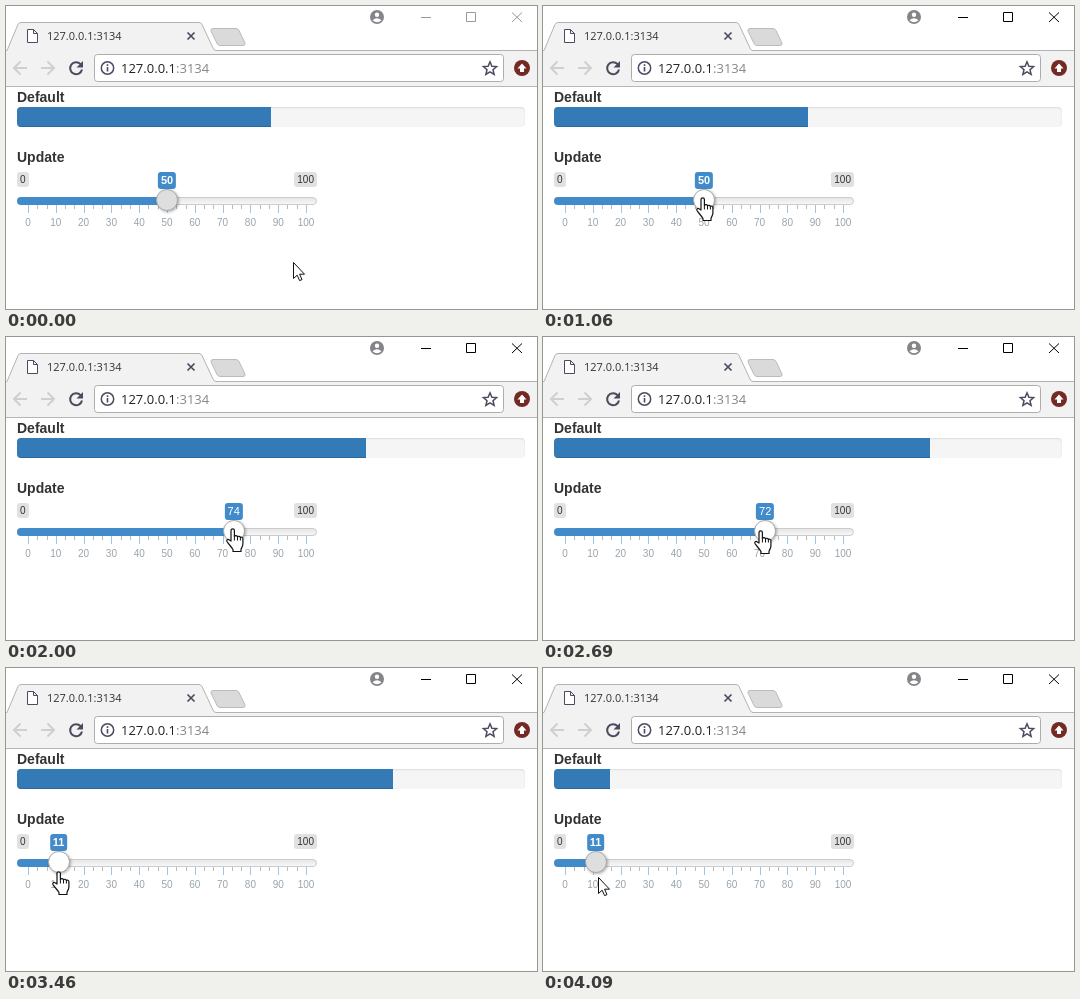
Recreate the animation shown at these times as an HTML page. Size 531 px wide and 303 px high, loop 4620 ms.

```html
<!DOCTYPE html>
<html lang="en">
<head>
<meta charset="utf-8">
<title>Progress bar update</title>
<style>
  html, body { margin: 0; width: 100%; height: 100%; overflow: hidden; background: #fff; }
  body { position: relative; font: 10px/1.333 "Liberation Sans", Arial, sans-serif; color: #333; }
  body > *, #slider * { position: absolute; box-sizing: border-box; }
  svg { left: 0; top: 0; }
  .ui { font-family: "Open Sans", "Noto Sans", sans-serif; }
  h4 { margin: 0; left: 11px; font-size: 14px; line-height: 20px; }
  #progress { left: 11px; top: 101px; width: 508px; height: 20px; border-radius: 4px; overflow: hidden;
    background: #f5f5f5; box-shadow: inset 0 1px 2px rgba(0,0,0,.1); }
  #bar { height: 100%; background: #337ab7; box-shadow: inset 0 -1px 0 rgba(0,0,0,.15); }
  #slider { left: 11px; top: 166px; width: 300px; height: 60px; }
  .tag { top: 0; padding: 1px 3px; border-radius: 3px; background: #e1e1e1; }
  #slider #value { background: #428bca; color: #fff; font-size: 11px; transform: translateX(-50%); }
  #line { top: 25px; width: 300px; height: 8px; border: 1px solid #ccc; border-radius: 8px;
    background: linear-gradient(#dedede -50%, #fff 150%); }
  #fill { top: 25px; height: 8px; border-radius: 8px 0 0 8px; background: #428bca; }
  #handle { top: 17px; width: 22px; height: 22px; border: 1px solid #aaa; border-radius: 50%;
    box-shadow: 1px 1px 3px rgba(0,0,0,.3); }
  .tick { top: 33px; width: 1px; height: 4px; background: #bbb; }
  .tick.big { height: 8px; background: #a0c5e4; }
  .num { top: 44px; color: #99a4ac; transform: translateX(-50%); }
</style>
</head>
<body>
<svg width="531" height="82" fill="none">
  <path d="M0 44h531v36H0z" fill="#f2f2f2"/>
  <path d="M0 44.5H1L12 18.500Q13 16.500 15 16.500H193Q195 16.500 196 18.500L207 42Q208 44.500 210 44.500H531" fill="#f2f2f2" stroke="#b3b3b3"/>
  <path d="M2 45H208" stroke="#f2f2f2" stroke-width="2"/>
  <path d="M207 22.500H230Q232 22.500 233 24.500L239 37Q239.500 39.500 237 39.500H214Q212 39.500 211 37.500L205 25Q204.500 22.500 207 22.500Z" fill="#dadada" stroke="#bcbcbc"/>
  <path d="M0 80.500H531" stroke="#b6b6b6"/>
  <path d="M21.500 23.500H27.500L31.500 27.500V36.500H21.500ZM27.500 23.500V27.500H31.500" fill="#fff" stroke="#4b4a60"/>
  <path d="M181.500 26.500l7 7m0-7l-7 7" stroke="#4b4a60" stroke-width="1.700"/>
  <g stroke="#cfcfcf" stroke-width="2">
    <path d="M21 62H8.500M14.500 55.500L8 62L14.500 68.500"/>
    <path d="M35 62H47.500M41.500 55.500L48 62L41.500 68.500"/>
  </g>
  <path d="M74.600 58.200A6 6 0 1 0 76 63.500" stroke="#4b4a60" stroke-width="2"/>
  <path d="M77 55V61.500H70.500Z" fill="#4b4a60"/>
  <rect x="88.500" y="48.500" width="409" height="27" rx="3" fill="#fff" stroke="#adadad"/>
  <circle cx="101.500" cy="62" r="6.200" stroke="#4b4a60" stroke-width="1.500"/>
  <path d="M101.500 61v4.500M101.500 58.300v1.700" stroke="#4b4a60" stroke-width="1.600"/>
  <path d="M484 55.800l1.900 4.400 4.700.4-3.600 3.100 1.100 4.600-4.100-2.500-4.100 2.500 1.100-4.600-3.600-3.100 4.700-.4z" stroke="#4b4a60" stroke-width="1.500"/>
  <circle cx="516" cy="62" r="8" fill="#742a24"/>
  <path d="M516 57.500L520.500 62.500H518V66H514V62.500H511.500Z" fill="#fff"/>
  <circle cx="371" cy="11" r="7" fill="#858489"/>
  <circle cx="371" cy="8.700" r="2.200" fill="#fff"/>
  <path d="M366.500 14.300q4.500-4 9 0q-4.500 4-9 0" fill="#fff"/>
  <path id="controls" d="M415 11.500h10M460.500 6.500h9v9h-9zM506 6.500l10 9.500m0-9.500l-10 9.500"/>
  <g class="ui">
    <text x="41" y="34" font-size="11" fill="#333">127.0.0.1:3134</text>
    <text x="115" y="67" font-size="13" fill="#222">127.0.0.1<tspan fill="#858585">:3134</tspan></text>
  </g>
</svg>

<h4 style="top:81px">Default</h4>
<div id="progress"><div id="bar"></div></div>
<h4 style="top:141px">Update</h4>
<div id="slider">
  <span class="tag" style="left:0">0</span>
  <span class="tag" style="right:0">100</span>
  <span class="tag" id="value"></span>
  <div id="line"></div>
  <div id="fill"></div>
  <div id="handle"></div>
</div>

<svg width="531" height="303" fill="#fff" stroke="#111" stroke-linejoin="round">
  <path id="arrow" d="M.5.5V16.500L4.200 13.200L6.600 18.600L9 17.600L6.600 12.200H11.500Z"/>
  <g id="hand">
    <path stroke-width="1.200" d="M-1 13V2.500a1.700 1.700 0 0 1 3.400 0V8.500c.5-1.300 2.900-1.200 3.100.4.600-1 2.700-.8 2.900.6.700-.8 2.500-.4 2.500 1.200V16c0 2.500-1.700 4-1.900 5.500V23.500H1V21.500C-.5 19-3.500 16-5 13.500C-5.800 12-4.200 10.800-3 11.800Z"/>
    <path d="M2.400 8.500V12.500M5.500 9V12.500M8.400 9.500V12.500"/>
  </g>
</svg>

<script>
const LOOP = 4620, STEP = 77;
const $ = id => document.getElementById(id);
const slider = $("slider");

// Slider value to pixels from the slider's left edge.
const toX = value => 11 + value * 2.78;

function addToSlider(className, left, text = "") {
  const el = document.createElement("span");
  el.className = className;
  el.style.left = left + "px";
  el.textContent = text;
  slider.insertBefore(el, $("handle"));
}

for (let i = 0; i <= 30; i++) {
  const value = i * 10 / 3, big = i % 3 === 0;
  addToSlider(big ? "tick big" : "tick", Math.round(toX(value)));
  if (big) addToSlider("num", toX(value), Math.round(value));
}

// Keys are [step, ...values].
const cursorKeys = [
  [5, 287, 256], [12, 159, 191], [15, 159, 191], [19, 226, 191], [26, 226, 191],
  [29, 225, 193], [34, 225, 193], [35, 217, 193], [40, 69, 202], [41, 59, 202],
  [42, 52, 202], [43, 52, 202], [44, 52, 203], [45, 52, 203], [48, 55, 208],
  [50, 55, 208], [52, 55, 209]
];
const valueKeys = [[15, 50], [19, 74], [34, 74], [35, 72], [40, 18], [41, 14], [42, 11]];

function sample(keys, step) {
  const next = keys.findIndex(key => key[0] > step);
  if (next === 0) return keys[0].slice(1);
  if (next < 0) return keys[keys.length - 1].slice(1);
  const a = keys[next - 1], b = keys[next];
  const p = (step - a[0]) / (b[0] - a[0]);
  return a.slice(1).map((v, i) => v + (b[i + 1] - v) * p);
}

// The CSS "ease" curve, solved by bisection.
function ease(x) {
  if (x <= 0) return 0;
  if (x >= 1) return 1;
  const bezier = (s, p1, p2) => 3 * (1 - s) ** 2 * s * p1 + 3 * (1 - s) * s * s * p2 + s ** 3;
  let low = 0, high = 1;
  for (let i = 0; i < 24; i++) {
    const mid = (low + high) / 2;
    if (bezier(mid, .25, .25) < x) low = mid; else high = mid;
  }
  return bezier(low, .1, 1);
}

function draw(time) {
  const step = Math.min(59, Math.floor((time % LOOP + 18) / STEP));
  const now = step * STEP;
  const progress = 50 + 24 * ease((now - 1714) / 600) - 63 * ease((now - 3470) / 600);
  $("bar").style.width = progress + "%";

  const value = Math.round(sample(valueKeys, step)[0]);
  const x = toX(value);
  $("value").textContent = value;
  $("value").style.left = x + "px";
  $("value").style.fontWeight = step >= 21 && step <= 35 ? 400 : 700;
  $("fill").style.width = x + "px";
  $("handle").style.left = x - 11 + "px";

  const [cx, cy] = sample(cursorKeys, step).map(Math.round);
  const hover = Math.hypot(cx - 11 - x, cy - 194) < 11.5;
  $("handle").style.background = hover ? "#fff" : "#dedede";
  $("arrow").setAttribute("visibility", hover ? "hidden" : "visible");
  $("hand").setAttribute("visibility", hover ? "visible" : "hidden");
  $("arrow").setAttribute("transform", `translate(${cx} ${cy})`);
  $("hand").setAttribute("transform", `translate(${cx} ${cy})`);
  $("controls").setAttribute("stroke", step < 14 ? "#999" : "#000");
}

const start = performance.now();
function frame() {
  draw(performance.now() - start);
  requestAnimationFrame(frame);
}
frame();
</script>
</body>
</html>
```
